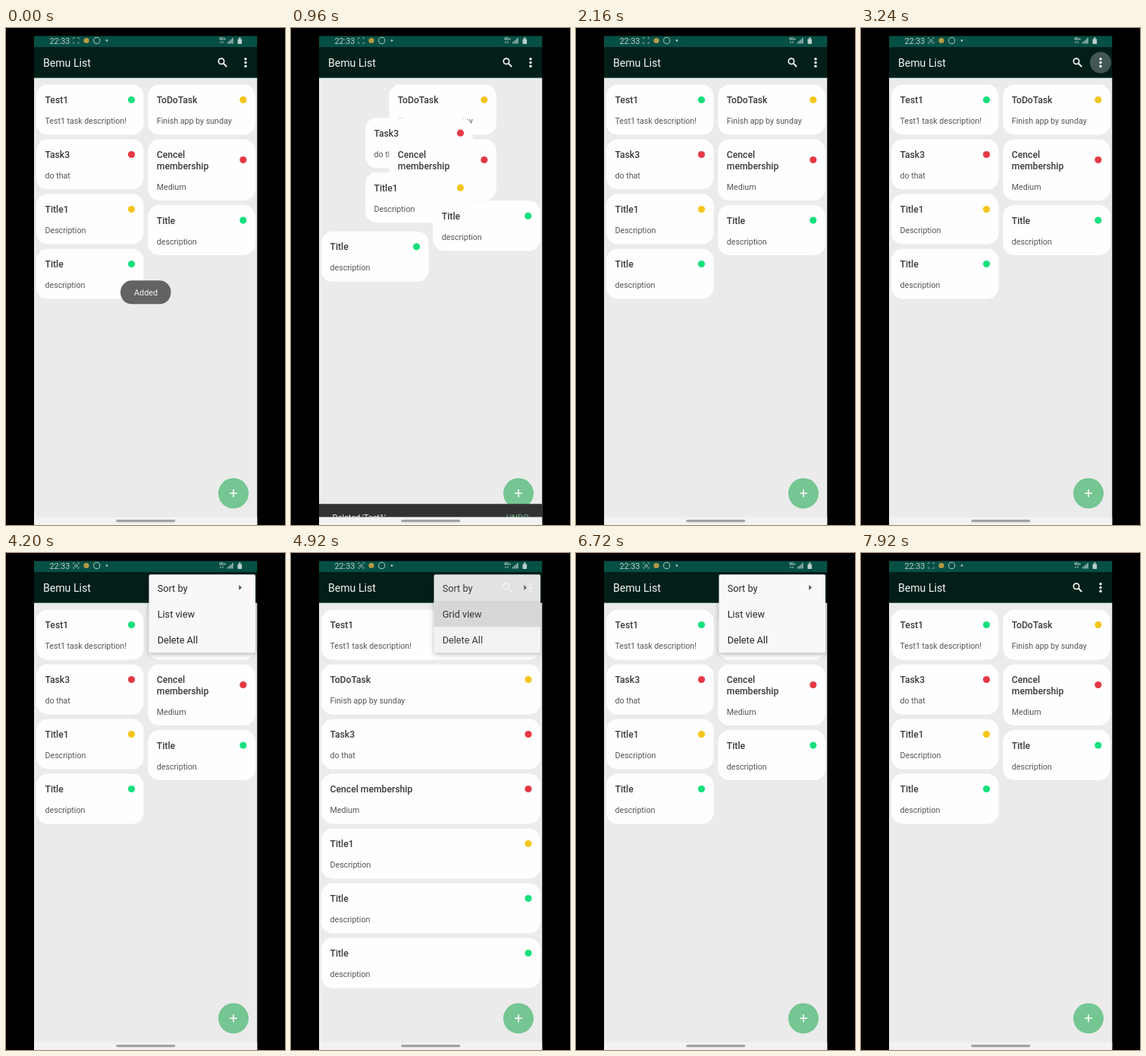
Animation, 368 px wide and 654 px high, one loop 8000 ms. Source, as an HTML page with a canvas:

```html
<!DOCTYPE html>
<html lang="en">
<head>
<meta charset="utf-8">
<title>Task list</title>
<style>
  html, body { margin: 0; width: 100%; height: 100%; overflow: hidden; background: #000; }
  canvas { display: block; }
</style>
</head>
<body>
<canvas id="stage" width="368" height="654"></canvas>
<script>
const ctx = document.getElementById('stage').getContext('2d');
const LOOP = 8000, STEP = 120;
const GREEN = '#17df7d', YELLOW = '#f4c51e', RED = '#e63946', MINT = '#75c692';

const tasks = [
  ['Test1', 'Test1 task description!', GREEN],
  ['ToDoTask', 'Finish app by sunday', YELLOW],
  ['Task3', 'do that', RED],
  ['Cencel membership', 'Medium', RED],
  ['Title1', 'Description', YELLOW],
  ['Title', 'description', GREEN],
  ['Title', 'description', GREEN],
].map(([title, desc, color]) => ({ title, desc, color }));

const clamp = v => Math.max(0, Math.min(1, v));
const ease = (t, from, to) => {
  const k = clamp((t - from) / (to - from));
  return k * k * (3 - 2 * k);
};
const mix = (a, b, k) => a + (b - a) * k;
const during = (t, from, to) => t >= from && t < to;

// Each card goes into the shorter of two columns.
function gridLayout(items) {
  const bottom = [74.5, 74.5], places = new Map();
  for (const item of items) {
    const col = bottom[0] <= bottom[1] ? 0 : 1;
    const h = item.title.length > 12 ? 80.5 : 66;
    places.set(item, { x: 40 + col * 147.3, y: bottom[col], w: 141.5, h });
    bottom[col] += h + 6;
  }
  return places;
}
const fullGrid = gridLayout(tasks);
const shortGrid = gridLayout(tasks.slice(1));
const listLayout = new Map(tasks.map((item, i) => [item, { x: 40, y: 74.5 + i * 72, w: 289, h: 66 }]));

function rect(x, y, w, h, fill, r = 0) {
  ctx.fillStyle = fill;
  ctx.beginPath();
  ctx.roundRect(x, y, w, h, r);
  ctx.fill();
}
function disc(x, y, r, fill) {
  ctx.fillStyle = fill;
  ctx.beginPath();
  ctx.arc(x, y, r, 0, Math.PI * 2);
  ctx.fill();
}
function line(color, width, ...points) {
  ctx.strokeStyle = color;
  ctx.lineWidth = width;
  ctx.beginPath();
  points.forEach(([x, y], i) => i ? ctx.lineTo(x, y) : ctx.moveTo(x, y));
  ctx.stroke();
}
function ring(x, y, r, color, width) {
  ctx.strokeStyle = color;
  ctx.lineWidth = width;
  ctx.beginPath();
  ctx.arc(x, y, r, 0, Math.PI * 2);
  ctx.stroke();
}
function text(str, x, y, size, fill, weight = 400) {
  ctx.font = `${weight} ${size}px Roboto, sans-serif`;
  ctx.fillStyle = fill;
  ctx.fillText(str, x, y);
}
function layer(alpha, draw) {
  if (alpha <= 0) return;
  ctx.save();
  ctx.globalAlpha = alpha;
  draw();
  ctx.restore();
}

function card(item, { x, y, w, h }) {
  rect(x, y, w, h, '#fefefe', 15);
  const lines = h > 70 ? item.title.split(' ') : [item.title];
  lines.forEach((part, i) => text(part, x + 11.5, y + 24.5 + i * 14.5, 12.2, '#3b3b3b', 500));
  text(item.desc, x + 11.5, y + h - 14.5, 10.65, '#555');
  disc(x + w - 16, y + (h > 70 ? 27 : 20), 4.6, item.color);
}

function cards(t) {
  if (during(t, 4800, 5880)) {
    listLayout.forEach((place, item) => card(item, place));
    return;
  }
  const removed = ease(t, 780, 1200) * (1 - ease(t, 1800, 2100));
  const swipe = t < 1800 ? 300 * ease(t, 480, 900) : 0;
  tasks.forEach((item, i) => {
    const a = fullGrid.get(item);
    if (i === 0) {
      const alpha = t < 1800 ? 1 - ease(t, 480, 960) : 1 - removed;
      layer(alpha, () => card(item, { ...a, x: a.x + swipe }));
    } else {
      const b = shortGrid.get(item);
      card(item, { ...a, x: mix(a.x, b.x, removed), y: mix(a.y, b.y, removed) });
    }
  });
}

function statusBar(t) {
  const ink = '#b9d0cb';
  rect(37, 10.5, 294.5, 15, '#064f45');
  text('22:33', 57.5, 20.5, 10.8, ink);
  for (const sx of [-1, 1]) for (const sy of [-1, 1]) {
    const x = 92.5 + sx * 3.7, y = 16.5 + sy * 3.7;
    line('#8fb0a9', 0.9, [x - sx * 2, y], [x, y], [x, y - sy * 2]);
  }
  if (during(t, 2400, 6360) || during(t, 6480, 7680)) {
    ring(92.5, 16.8, 1.7, ink, 1);
  }
  disc(106, 16.5, 3.6, '#b59a45');
  ring(119.7, 16.5, 4.1, ink, 1);
  disc(133, 16.5, 1.3, ink);
  text('4G+', 281, 16.3, 5, ink, 700);
  line(ink, 1, [283, 17.5], [283, 20]);
  line(ink, 1, [286, 17.5], [286, 20]);
  for (let i = 0; i < 4; i++) rect(292 + i * 2.1, 18.5 - i * 1.8, 1.3, 2 + i * 1.8, ink);
  rect(305.5, 14.5, 5.6, 6.5, ink, 1);
  rect(307, 12.5, 2.6, 2, ink);
}

function appBar(t) {
  rect(37, 25.5, 294.5, 40.5, '#021e19');
  rect(37, 65, 294.5, 1, '#3d6f61');
  text('Bemu List', 49, 51.3, 14.1, '#f3f6f5');
  ring(284, 43.8, 3.7, '#fff', 1.6);
  line('#fff', 1.8, [286.7, 46.5], [291.2, 51]);
  const ripple = during(t, 2880, 3480) ? ease(t, 2760, 3120) : 0;
  if (ripple) disc(316, 45.5, 14 * ripple, 'rgba(255,255,255,.25)');
  for (const dy of [-4.8, 0, 4.8]) disc(316, 45.5 + dy, 1.7, '#fff');
}

function menuState(t) {
  if (t < 3300 || t >= 7200) return { alpha: 0 };
  const faded = during(t, 4800, 5640) || during(t, 5880, 6720);
  return {
    alpha: faded ? 0.91 : ease(t, 3240, 3540) * (1 - ease(t, 6960, 7200)),
    pressed: during(t, 4680, 5640) || during(t, 5760, 6720),
    label: during(t, 4800, 5880) ? 'Grid view' : 'List view',
  };
}

function menu(t) {
  const { alpha, pressed, label } = menuState(t);
  layer(alpha, () => {
    ctx.shadowColor = 'rgba(0,0,0,.3)';
    ctx.shadowBlur = 6;
    ctx.shadowOffsetY = 2;
    rect(188.5, 28.3, 140.5, 103, '#f8f8f8', 2);
    ctx.shadowColor = 'transparent';
    if (pressed) rect(188.5, 63, 140.5, 34.3, '#d5d5d5');
    ['Sort by', label, 'Delete All'].forEach((row, i) =>
      text(row, 199.7, 50.5 + i * 34.4, 12.7, '#262626'));
    ctx.fillStyle = '#555';
    ctx.beginPath();
    ctx.moveTo(307.3, 42);
    ctx.lineTo(311, 45.5);
    ctx.lineTo(307.3, 49);
    ctx.fill();
  });
}

function snackbar(t) {
  const shown = ease(t, 780, 1140) * (1 - ease(t, 1800, 2100));
  if (!shown) return;
  const y = 643.5 - 34.5 * shown;
  rect(37, y, 294.5, 34.5, '#323232');
  text("Deleted 'Test1'", 54.5, y + 21.5, 10.9, '#eee');
  if (t >= 1800) disc(297, y + 18, 15, '#4b4d4c');
  text('UNDO', 284, y + 21.5, 11, '#6eb387');
}

function draw(t) {
  rect(0, 0, 368, 654, '#000');
  ctx.save();
  ctx.beginPath();
  ctx.rect(37, 10, 294.5, 644);
  ctx.clip();
  rect(37, 66, 294.5, 588, '#ebebeb');
  cards(t);
  disc(300, 612.3, 20, MINT);
  line('#fff', 1.6, [295, 612.3], [305, 612.3]);
  line('#fff', 1.6, [300, 607.3], [300, 617.3]);
  statusBar(t);
  appBar(t);
  layer(1 - ease(t, 60, 240), () => {
    rect(151, 332.3, 66.5, 31, '#636363', 15);
    text('Added', 169, 352, 10.8, '#f4f4f4');
  });
  snackbar(t);
  menu(t);
  rect(37, 643.5, 294.5, 10.5, '#f2f2f2');
  rect(145.3, 647, 78, 3.2, '#a3a3a3', 1.6);
  ctx.restore();
}

function tick() {
  const t = performance.now() % LOOP;
  draw(Math.floor(t / STEP) * STEP);
  requestAnimationFrame(tick);
}
tick();
</script>
</body>
</html>
```
